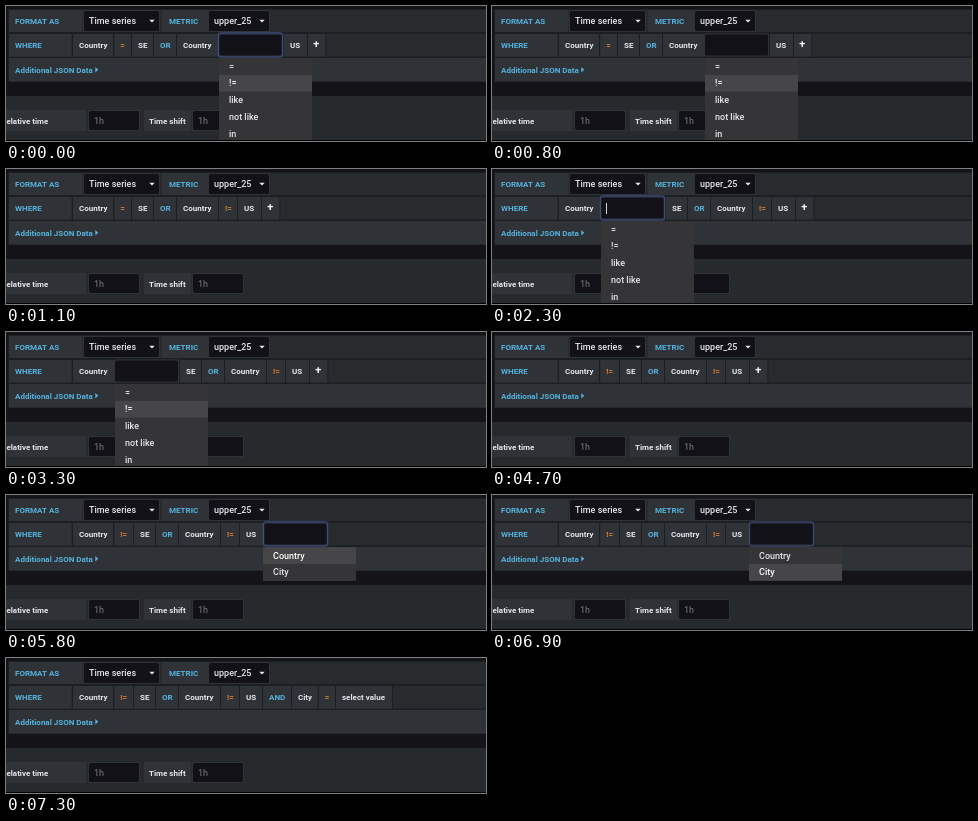
Recreate the animation shown at these times as an HTML page with a canvas. Size 480x135 px, loop 8 s.

```html
<!DOCTYPE html>
<html lang="en">
<head>
<meta charset="utf-8">
<title>Query editor</title>
<style>
html, body { margin: 0; width: 100%; height: 100%; overflow: hidden; background: #131317; }
canvas { display: block; width: 480px; height: 135px; }
</style>
</head>
<body>
<canvas id="stage" width="480" height="135"></canvas>
<script>
const ctx = document.getElementById('stage').getContext('2d');
const LOOP = 8000;
const BLUE = '#55b2dd', ORANGE = '#e0812f', WHITE = '#e6e7e9';
const CELL = '#2f3337', FILL = '#272b2d', GAP = '#1c1f22', INPUT = '#111117', DARK = '#141318';
const LABEL_FONT = '700 8px Roboto, Arial, sans-serif';
const VALUE_FONT = '500 9px Roboto, Arial, sans-serif';
const PLUS_FONT = '700 11px Roboto, Arial, sans-serif';
const OPS = ['=', '!=', 'like', 'not like', 'in'];
const ROW = 16.7;

function rect(x, y, w, h, color) {
  ctx.fillStyle = color;
  ctx.fillRect(x, y, w, h);
}

function text(str, x, y, color = WHITE, font = LABEL_FONT) {
  ctx.font = font;
  ctx.fillStyle = color;
  ctx.fillText(str, x, y);
}

function box(x, y, w, h, color) {
  ctx.fillStyle = color;
  ctx.beginPath();
  ctx.roundRect(x, y, w, h, 1.5);
  ctx.fill();
}

function triangle(points, color) {
  ctx.fillStyle = color;
  ctx.beginPath();
  points.forEach(([x, y]) => ctx.lineTo(x, y));
  ctx.fill();
}

// Dark input well with a thin frame around it
function well(x, y, w, h) {
  box(x, y, w, h, CELL);
  box(x + 1, y + 1, w - 2, h - 2, INPUT);
}

function select(str, x, w) {
  well(x, 4, w, 22);
  text(str, x + 6, 18, WHITE, VALUE_FONT);
  const a = x + w - 8;
  triangle([[a - 2.7, 13.7], [a + 2.7, 13.7], [a, 16.6]], WHITE);
}

function placeholder(x) {
  well(x, 104, 52, 21);
  text('1h', x + 6, 117.5, '#66686d', VALUE_FONT);
}

function background() {
  rect(0, 0, 480, 135, DARK);
  rect(2, 3, 478, 73, GAP);
  rect(3, 4, 477, 22, FILL);
  rect(3, 28, 477, 22.5, FILL);
  rect(3, 52, 477, 23.5, CELL);

  rect(3, 4, 73, 22, CELL);
  text('FORMAT AS', 9, 18, BLUE);
  select('Time series', 77, 77);
  rect(156, 4, 46, 22, CELL);
  text('METRIC', 163, 18, BLUE);
  select('upper_25', 202, 62);

  rect(3, 28, 62, 22.5, CELL);
  text('WHERE', 9, 42, BLUE);
  text('Additional JSON Data', 9, 66.5, BLUE);
  triangle([[89.3, 61], [92.3, 63.7], [89.3, 66.4]], BLUE);

  rect(0, 90, 480, 44, '#262a2c');
  rect(0, 104, 80, 21, CELL);
  text('Relative time', -4.7, 117.5);
  placeholder(82);
  rect(138, 104, 47, 21, CELL);
  text('Time shift', 143, 117.5);
  placeholder(186);
}

const colors = { '=': ORANGE, '!=': ORANGE, OR: BLUE, AND: BLUE };

// Words in order, each with its left text edge; an empty word leaves room for the input
function segments(words, xs) {
  words.forEach((word, i) => {
    if (!word) return;
    ctx.font = LABEL_FONT;
    const x = xs[i];
    const next = xs[i + 1];
    const wide = ctx.measureText(word).width + 13;
    const w = next ? Math.min(next - x - 1, wide) : wide;
    rect(x - 7, 28, w + 2, 22.5, GAP);
    rect(x - 6, 28, w, 22.5, CELL);
    if (word === '+') text('+', x - 0.7, 42.3, '#f2f2f2', PLUS_FONT);
    else text(word, x, 42, colors[word] || WHITE);
  });
}

function field(x, glow, caret) {
  well(x, 27.5, 65, 23);
  if (glow > 0) {
    ctx.save();
    ctx.globalAlpha = glow;
    ctx.strokeStyle = '#414d78';
    ctx.shadowColor = '#3a4a7c';
    ctx.shadowBlur = 2;
    ctx.beginPath();
    ctx.roundRect(x + 0.5, 27, 64, 24, 2);
    ctx.stroke();
    ctx.restore();
  }
  if (caret) rect(x + 6, 34, 1, 11, '#d5d6d8');
}

function menu(x, items, active) {
  rect(x, 52, 93, items.length * ROW + 0.6, '#353537');
  items.forEach((item, i) => {
    const y = 52.2 + i * ROW;
    const on = i === active;
    if (on) rect(x, y, 93, ROW, '#464649');
    text(item, x + 10, y + 11.5, on ? '#ffffff' : WHITE, VALUE_FONT);
  });
}

const fade = (t, start, length) => 1 - Math.min(1, Math.max(0, (t - start) / length));
const blink = (t, start) => Math.floor((t - start) / 500) % 2 === 0;

const both = ['Country', '!=', 'SE', 'OR', 'Country', '!=', 'US'];
const bothX = [73, 114.3, 134, 156, 179, 221, 240];

function draw(t) {
  background();
  if (t < 1100) {
    segments(['Country', '=', 'SE', 'OR', 'Country', '', 'US', '+'],
      [73, 114.3, 132, 154, 177, 219, 284, 308]);
    field(212, fade(t, 350, 400), false);
    menu(213, OPS, 1);
  } else if (t < 2300) {
    segments(['Country', '=', 'SE', 'OR', 'Country', '!=', 'US', '+'],
      [73, 114.3, 132, 154, 177, 219, 238, 262]);
  } else if (t < 3400) {
    segments(['Country', '', 'SE', 'OR', 'Country', '!=', 'US', '+'],
      [73, 115, 180, 202, 225, 267, 286, 310]);
    field(108, fade(t, 3050, 220), t < 3100 && blink(t, 2300));
    menu(109, OPS, t < 2600 ? -1 : 1);
  } else if (t < 4900) {
    segments([...both, '+'], [...bothX, 264]);
  } else if (t < 7300) {
    segments(both, bothX);
    field(257, fade(t, 6850, 220), t < 6900 && blink(t, 4900));
    menu(257, ['Country', 'City'], t < 5800 ? -1 : t < 6000 ? 0 : 1);
  } else {
    segments([...both, 'AND', 'City', '=', 'select value'], [...bothX, 263, 292, 318.8, 336]);
  }
  rect(0, 134, 480, 1, '#000');
}

function tick() {
  draw(performance.now() % LOOP);
  requestAnimationFrame(tick);
}
tick();
</script>
</body>
</html>
```
